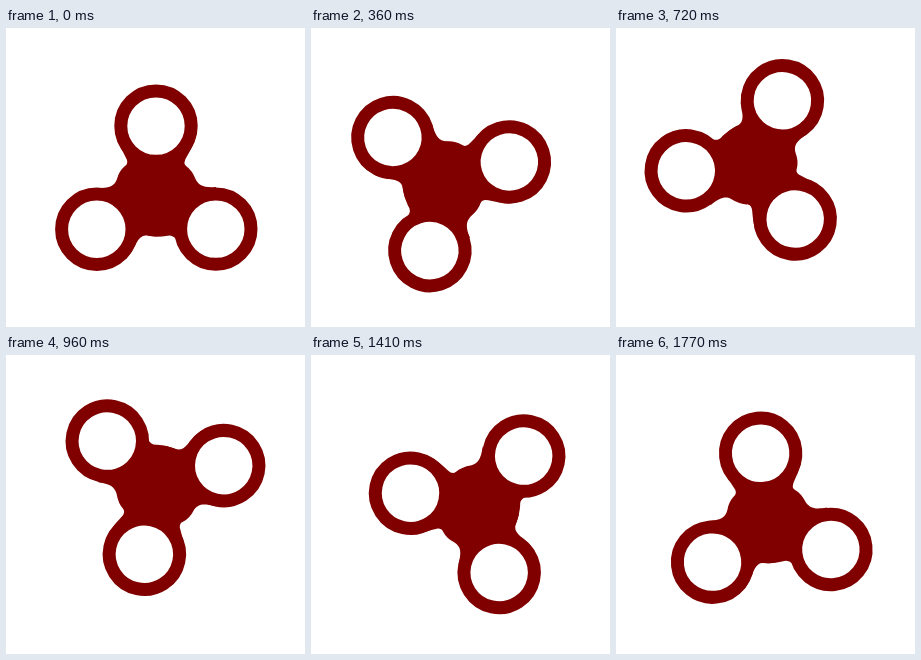
An HTML page that plays this animation: 299 by 299 pixels, repeating every 1.8 s.

```html
<!DOCTYPE html>
<html lang="en">
<head>
<meta charset="utf-8">
<title>Spinner</title>
<style>
  html, body { margin: 0; width: 100%; height: 100%; overflow: hidden; background: #fff; }
  svg { display: block; width: 100vw; height: 100vh; }
</style>
</head>
<body>
<svg viewBox="0 0 299 299">
  <g id="spinner" fill="#800000">
    <path d="M109 98C109 112 117 123 121 132Q122 136 119 138Q113 143 111 151C108 159 103 160 91 160
      V201L120 231C127 224 129 215 134 210Q138 206 145 208Q152 209 160 208Q166 206 170 211
      C175 217 176 224 182 232L210 201V159C197 160 193 157 190 152Q186 142 180 138
      Q177 135 180 130C186 120 191 111 191 98Z"/>
    <circle cx="150" cy="167" r="41.5"/>
    <g fill="#fff" stroke="#800000" stroke-width="13">
      <circle cx="150" cy="98.1" r="35.2"/>
      <circle cx="90.8" cy="201.3" r="35.2"/>
      <circle cx="209.8" cy="201.1" r="35.2"/>
    </g>
  </g>
</svg>
<script>
  const LOOP = 1800, STEP = 30;
  const spinner = document.getElementById('spinner');

  function draw() {
    const step = Math.floor(performance.now() % LOOP / STEP);
    spinner.setAttribute('transform', `rotate(${step * STEP / LOOP * 360} 149.5 149.3)`);
    requestAnimationFrame(draw);
  }
  draw();
</script>
</body>
</html>
```
